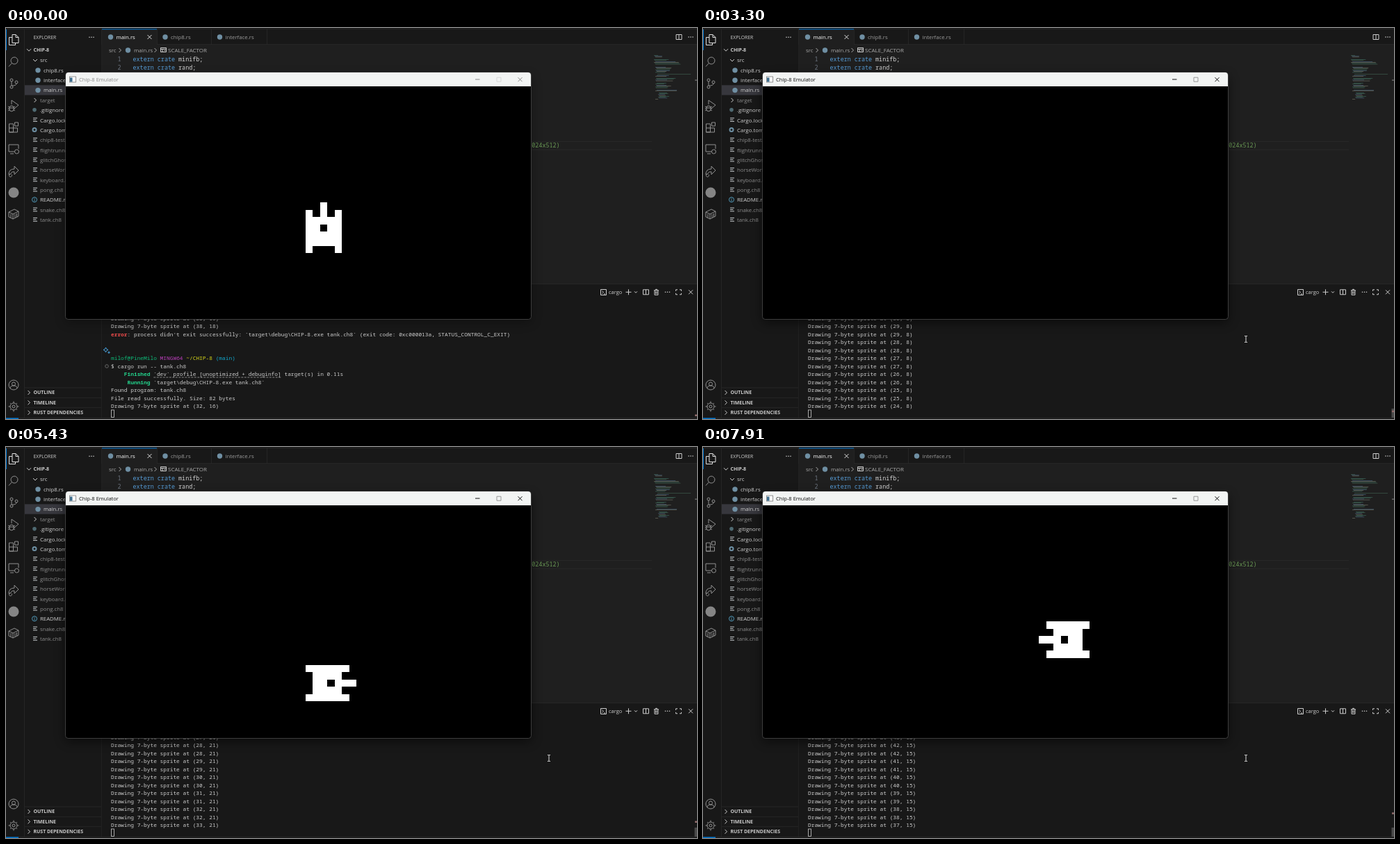
An HTML page that plays this animation: 994 px wide and 563 px high, repeating every 8000 ms.

```html
<!DOCTYPE html>
<html lang="en">
<head>
<meta charset="utf-8">
<title>Chip-8 Emulator</title>
<style>
html, body { margin: 0; width: 100%; height: 100%; overflow: hidden; background: #181818; }
svg { display: block; width: 100vw; height: 100vh; }
text { font-family: "Open Sans", "Noto Sans", sans-serif; white-space: pre; }
.mono { font-family: "Noto Sans Mono", "DejaVu Sans Mono", monospace; }
.line { fill: none; stroke-width: 1; }
</style>
</head>
<body>
<svg id="stage" viewBox="0 0 994 563"></svg>
<script>
const LOOP = 8000;
const CELL = 669 / 64;
const SCREEN = { x: 86, y: 84 };
const ROW = 11.52, LAST_ROW = 547.4, ROWS = 13;

// ---------- drawing helpers ----------
const rect = (x, y, w, h, fill, extra = '') =>
  `<rect x="${x}" y="${y}" width="${w}" height="${h}" fill="${fill}" ${extra}/>`;
const disc = (x, y, r, fill) => `<circle cx="${x}" cy="${y}" r="${r}" fill="${fill}"/>`;
const line = (d, stroke = '#ccc', x = 0, y = 0, extra = '') =>
  `<path class="line" transform="translate(${x} ${y})" d="${d}" stroke="${stroke}" ${extra}/>`;
// y is the middle of the capital letters
const label = (x, y, str, fill = '#ccc', size = 7.8, extra = '') =>
  `<text x="${x}" y="${y + size * 0.357}" font-size="${size}" fill="${fill}" ${extra}>${str}</text>`;
const code = (x, y, str, fill) => label(x, y, str, fill, 8.42, 'class="mono"');
const span = (str, fill, extra = '') => `<tspan fill="${fill}" ${extra}>${str}</tspan>`;

const RIGHT = 'M-1.5 -3l3 3l-3 3', DOWN = 'M-3 -1.5l3 3l3 -3';
const CROSS = 'M-3 -3l6 6m0 -6l-6 6', SPLIT = 'M-4 -3.5h8v7h-8zM0 -3.5v7';
const dots = (x, y) => [-3, 0, 3].map(d => disc(x + d, y, 0.8, '#ccc')).join('');

// ---------- editor ----------
function activityBar() {
  const icons = [
    [17, 'M-2 -7.500h5l4 4v8h-9zM3 -7.500v4h4M-2 -3.500h-4.500v11h9v-3', '#e0e0e0'],
    [48, 'M-3 2a5 5 0 1 1 1 1zM-2.500 2.500l-4.500 5'],
    [80, 'M-5 -5a2 2 0 1 1 4 0a2 2 0 1 1 -4 0M-5 5a2 2 0 1 1 4 0a2 2 0 1 1 -4 0M2 -2a2 2 0 1 1 4 0a2 2 0 1 1 -4 0M-3 -3v6M4 0q0 3 -6 3'],
    [112, 'M-3 -2v-6l10 7l-6 5M-6 3a3 3 0 0 1 6 0v2a3 3 0 0 1 -6 0zM-6 3h6M-8 1l2 1M-8 4h2M-8 7l2 -1M2 1l-2 1M2 4h-2M2 7l-2 -1'],
    [143, 'M-6.500 -5h6v12h-6zM-6.500 1h12v6h-12zM1.500 -7h5v5h-5z'],
    [174, 'M1 4h-8v-10h14v6M-5 7h5M1.500 4a3 3 0 1 1 6 0a3 3 0 1 1 -6 0'],
    [205, 'M-7 6q0 -8 8 -8v-4l6 6l-6 6v-4q-5 0 -5 3zM-6 6a2 2 0 1 0 3 0'],
    [268, 'M-7 -3l8 -4l6 3v7l-8 4l-6 -3zM-7 -3l6 3l8 -4M-1 0v7M-4 0v5M2 0v5M4.500 -1v5'],
    [514, 'M-7 0a7 7 0 1 1 14 0a7 7 0 1 1 -14 0M-2.500 -1.500a2.500 2.500 0 1 1 5 0a2.500 2.500 0 1 1 -5 0M-5 5q0 -4 5 -4q5 0 5 4'],
    [545, 'M-2 0a2 2 0 1 1 4 0a2 2 0 1 1 -4 0M-5 0a5 5 0 1 1 10 0a5 5 0 1 1 -10 0M0 -7.500v2.500M0 5v2.500M-7.500 0h2.500M5 0h2.500M-5 -5l1.500 1.500M5 5l-1.500 -1.500M5 -5l-1.500 1.500M-5 5l1.500 -1.500'],
  ];
  return rect(26, 2, 0.7, 559, '#2b2b2b') + rect(0, 2, 1, 30, '#0078d4') +
    icons.map(([y, d, color = '#909090']) => line(d, color, 11, y)).join('') +
    disc(11, 237, 7.5, '#858585');
}

function sidebar() {
  const files = [
    ['src', 'open'], ['chip8.rs', 'rust'], ['interface.rs', 'rust'], ['main.rs', 'rust'],
    ['target', 'closed', 1], ['.gitignore', 'git'], ['Cargo.lock', 'list'], ['Cargo.toml', 'gear'],
    ['chip8-test.ch8', 'list', 1], ['flightrunner.ch8', 'list', 1], ['glitchGhost.ch8', 'list', 1],
    ['horseWorld.ch8', 'list', 1], ['keyboard.ch8', 'list', 1], ['pong.ch8', 'list', 1],
    ['README.md', 'info'], ['snake.ch8', 'list', 1], ['tank.ch8', 'list', 1],
  ];
  const icon = {
    open: y => line(DOWN, '#ccc', 42, y),
    closed: y => line(RIGHT, '#ccc', 42, y),
    rust: y => disc(46, y, 3.7, '#6f8fa3'),
    git: y => disc(41, y - 0.5, 2.8, '#4f6a72'),
    list: y => line('M-3 -2.600h6M-3 -.2h4.500M-3 2.200h6', '#c0c5c8', 42, y - 0.4),
    gear: y => line('M-2.500 0a2.500 2.500 0 1 1 5 0a2.500 2.500 0 1 1 -5 0', '#6d8fa3', 41, y - 0.5, 'style="stroke-width:2"'),
    info: y => line('M-3.500 0a3.500 3.500 0 1 1 7 0a3.500 3.500 0 1 1 -7 0M0 -.5v2.500M0 -2v.8', '#519aba', 41, y - 0.5),
  };
  const section = (y, name, d = RIGHT) => line(d, '#ccc', 33, y) +
    label(39.5, y, name, '#ccc', 6.95, 'font-weight="700"');
  let out = label(39.5, 13.3, 'EXPLORER', '#ccc', 6.8) + dots(123, 13.3) +
    rect(27, 82.3, 110, 14.3, '#37373d') + section(31.7, 'CHIP-8', DOWN);
  files.forEach(([name, kind, dim], i) => {
    const y = 46.5 + 14.37 * i;
    out += icon[kind](y) + label(kind === 'rust' ? 54 : 49, y, name, dim ? '#8c8c8c' : '#d0d0d0');
  });
  ['OUTLINE', 'TIMELINE', 'RUST DEPENDENCIES'].forEach((name, i) => {
    const y = 525 + 14.4 * i;
    out += rect(27, y - 7.4, 110, 0.7, '#2b2b2b') + section(y, name);
  });
  return out + rect(137, 2, 0.7, 559, '#2b2b2b');
}

function minimap() {
  // first y, last y, indent, width
  const blocks = [[39, 42, 0, 11], [45, 47, 0, 24], [48, 53, 0, 42], [56, 64, 2, 24], [66, 67, 4, 54],
    [68, 70, 2, 20], [72, 77, 2, 30], [79, 81, 2, 16], [82, 87, 2, 24], [89, 91, 2, 48], [93, 101, 6, 16], [102, 103, 0, 5]];
  const colors = ['#4b7562', '#53779a', '#8a8a78', '#45806f'];
  let out = '', n = 0;
  for (const [top, bottom, indent, width] of blocks)
    for (let y = top; y < bottom; y += 1.25, n++) {
      const noise = Math.abs(Math.sin(n * 12.99) * 43.7) % 1;
      out += rect(932 + indent + n % 3, y, width * (0.55 + 0.45 * noise), 0.7, colors[n % 4], 'opacity=".7"');
    }
  return out;
}

function editor() {
  const tab = (x, name, color) => disc(x, 13, 3.7, '#6f8fa3') + label(x + 8, 13.3, name, color);
  return rect(137.7, 24, 857, 345, '#1f1f1f') +
    rect(137.7, 23.3, 857, 0.7, '#2b2b2b') + rect(138, 2, 79, 22, '#1f1f1f') + rect(138, 1.3, 79, 1, '#0078d4') +
    [217, 295, 375].map(x => rect(x, 2, 0.7, 22, '#2b2b2b')).join('') +
    tab(150.5, 'main.rs', '#fff') + line(CROSS, '#ddd', 206.5, 13) +
    tab(229, 'chip8.rs', '#9d9d9d') + tab(307.5, 'interface.rs', '#9d9d9d') +
    line(SPLIT, '#ccc', 968, 13) + dots(985, 13) +
    label(148, 32, 'src', '#a9a9a9') + line(RIGHT, '#a9a9a9', 164, 32) + disc(175.500, 32, 3.7, '#6f8fa3') +
    label(184, 32, 'main.rs', '#a9a9a9') + line(RIGHT, '#a9a9a9', 215, 32) +
    line('M-4 -3h8v6h-8zM-4 -1h8M-1.500 -1v4M1 1h2', '#ccc', 226.5, 31.5) + label(233, 32, 'SCALE_FACTOR', '#a9a9a9', 8) +
    ['minifb', 'rand'].map((name, i) => {
      const y = 44.7 + 12.5 * i;
      return code(160.5, y, i + 1, '#6e7681') +
        code(182.5, y, span('extern crate', '#569cd6') + span(` ${name};`, '#d4d4d4'));
    }).join('') +
    rect(182, 163.2, 747, 0.8, '#2b2b2b') + rect(182, 174.8, 747, 0.8, '#2b2b2b') +
    code(756.3, 169.4, '024x512)', '#6a9955') +
    minimap() + rect(991, 74.6, 3, 1, '#8a8a8a');
}

function panel() {
  return rect(137.7, 368, 857, 193, '#181818') + rect(137.7, 368, 857, 0.8, '#2b2b2b') +
    line('M-4 -4h8v8h-8zM-2 -2l2 2l-2 2M.5 2.500h2', '#ccc', 859.500, 380.5) + label(867, 380.7, 'cargo', '#ccc', 7.5) +
    line('M-4 0h8M0 -4v8', '#ccc', 895.5, 380.3) + line('M-2 -1l2 2l2 -2', '#ccc', 906, 380.3) +
    line(SPLIT, '#ccc', 920.5, 380.3) +
    line('M-3.500 -2.500h7M-2.500 -2.500v6.500h5v-6.500M-1 -2.500v-1.500h2v1.500M-.8 -1v3.500M.8 -1v3.500', '#ccc', 935.5, 380.3) +
    dots(951.5, 380.3) +
    line('M-4 -1.500v-2h2.500M4 -1.500v-2h-2.500M-4 1.500v2h2.500M4 1.500v2h-2.500', '#ccc', 967.5, 380.3) +
    line(CROSS, '#ccc', 985, 380.3);
}

// ---------- terminal log ----------
const sprite = (x, y) => ({ text: `Drawing 7-byte sprite at (${x}, ${y})` });
const bold = 'font-weight="700"';
const intro = [
  sprite(38, 19), sprite(38, 18),
  { text: span('error', '#f14c4c', bold) + ": process didn't exit successfully: `target\\debug\\CHIP-8.exe tank.ch8` (exit code: 0xc000013a, STATUS_CONTROL_C_EXIT)" },
  { text: '' },
  { text: '', mark: y => `<path transform="translate(145 ${y})" fill="none" stroke="#4aa3df" d="M-1.500 -4q.5 3 3.500 3.500q-3 .5 -3.500 3.500q-.5 -3 -3.500 -3.500q3 -.5 3.500 -3.500M3 1.500v3.500M1.300 3.200h3.500"/>` },
  { text: span('milof@PineMilo', '#0dbc79') + ' ' + span('MINGW64', '#bc3fbc') + ' ' + span('~/CHIP-8', '#d8d81a') + ' ' + span('(main)', '#11a8cd') },
  { text: '$ cargo run -- tank.ch8', mark: y => `<circle cx="145" cy="${y}" r="2.300" fill="none" stroke="#666"/>` },
  { text: '    ' + span('Finished', '#23d18b', bold) + ' `dev` profile [unoptimized + debuginfo] target(s) in 0.11s',
    mark: y => line('M212.300 0h184', '#bbb', 0, y + 4.5, 'stroke-dasharray="3 1.500" style="stroke-width:.7"') },
  { text: '     ' + span('Running', '#23d18b', bold) + ' `target\\debug\\CHIP-8.exe tank.ch8`' },
  { text: 'Found program: tank.ch8' },
  { text: 'File read successfully. Size: 82 bytes' },
];

// ---------- tank ----------
const SHAPES = {
  up: [0x10, 0x54, 0x7c, 0x6c, 0x7c, 0x7c, 0x44],
  down: [0x44, 0x7c, 0x7c, 0x6c, 0x7c, 0x54, 0x10],
  right: [0, 0xfc, 0x78, 0x6e, 0x78, 0xfc, 0],
  left: [0, 0x3f, 0x1e, 0x76, 0x1e, 0x3f, 0],
};
const STEP = { up: [0, -1], down: [0, 1], left: [-1, 0], right: [1, 0] };

// start, end, pictures shown, direction, cells travelled
const moves = [
  [1770, 1960, 4, 'up', 8], [2690, 2900, 4, 'left', 8], [3240, 3370, 3, 'left', 6],
  [3770, 3980, 4, 'down', 7], [4240, 4440, 4, 'down', 6], [4700, 4830, 3, 'right', 6],
  [4960, 5100, 3, 'right', 6], [5360, 5490, 3, 'right', 6], [5750, 5920, 3, 'right', 6],
  [6170, 6320, 3, 'up', 6], [6970, 7120, 3, 'right', 7], [7380, 7580, 4, 'left', 6], [7720, 7910, 4, 'left', 6],
];

const path = [{ x: 32, y: 16, dir: 'up' }];
const events = [{ time: 0, at: 0, shown: true }];
for (const [start, end, count, dir, cells] of moves) {
  const base = path.length - 1;
  for (let i = 0; i < cells; i++) {
    const { x, y } = path[path.length - 1];
    path.push({ x: x + STEP[dir][0], y: y + STEP[dir][1], dir });
  }
  // each burst opens with the erased sprite
  for (let k = 0; k < count; k++) {
    const part = k / (count - 1);
    events.push({ time: start + (end - start) * part, at: base + Math.round(cells * part), shown: k > 0 });
  }
}

// every step logs one erase and one draw
const log = [...intro, sprite(path[0].x, path[0].y)];
for (let i = 1; i < path.length; i++)
  log.push(sprite(path[i - 1].x, path[i - 1].y), sprite(path[i].x, path[i].y));

function tankPath({ x, y, dir }) {
  let d = '';
  SHAPES[dir].forEach((bits, row) => {
    for (let col = 0; col < 8; col++)
      if (bits & (0x80 >> col))
        d += `M${SCREEN.x + (x + col) * CELL} ${SCREEN.y + (y + row) * CELL}h${CELL}v${CELL}h${-CELL}z`;
  });
  return d;
}

function terminalRows(at) {
  const end = intro.length + 1 + 2 * at;
  return log.slice(Math.max(0, end - ROWS), end).reverse().map(({ text, mark }, i) => {
    const y = LAST_ROW - i * ROW;
    return `<text class="mono" x="151" y="${y}" font-size="7.855" fill="#ccc">${text}</text>` + (mark ? mark(y - 2.8) : '');
  }).join('');
}

// ---------- scene ----------
const $ = id => document.getElementById(id);
$('stage').innerHTML = `
  <defs><filter id="blur" x="-10%" y="-20%" width="120%" height="140%"><feGaussianBlur stdDeviation="8"/></filter></defs>
  ${rect(0, 0, 994, 563, '#181818')}${rect(0, 1, 994, 0.7, '#2b2b2b')}
  ${activityBar()}${sidebar()}${editor()}${panel()}
  <g id="log"></g>
  <rect x="151.500" y="550" width="4" height="10.500" fill="none" stroke="#ccc" stroke-width=".8"/>
  ${rect(990.5, 548, 3.5, 13, '#4a4a4a', 'id="slider"')}
  ${rect(991, 0, 3, 2.5, '#8f6a6a', 'id="mark"')}
  ${rect(0, 561, 994, 0.7, '#2b2b2b')}${rect(0, 561.5, 18, 1.5, '#0078d4')}
  ${rect(86, 70, 669, 353, '#000', 'id="shadow" filter="url(#blur)"')}
  ${rect(85.5, 64, 670, 355.5, '#000', 'rx="4" stroke="#555" stroke-width=".7"')}
  <path d="M86 84v-16q0 -4 4 -4h661q4 0 4 4v16z" fill="#f2f4f3"/>
  ${rect(91.5, 70, 9, 8, '#fff', 'stroke="#777" stroke-width=".8"')}${rect(92, 71.500, 3.5, 6, '#3f6f8f')}
  <g id="title">${label(105, 74.2, 'Chip-8 Emulator', 'currentColor', 7.55)}
  ${line('M-3 0h6.500', 'currentColor', 678, 74)}${line(CROSS, 'currentColor', 739.5, 74.2)}</g>
  ${line('M-3 -3h6v6h-6z', '#b0b0b0', 709, 74.2, 'id="maximise"')}
  <path id="tank" fill="#fff" shape-rendering="crispEdges"/>
  <path id="arrow" d="M0 0v10l2.500 -2.300l1.700 3.600l1.500 -.7l-1.700 -3.500h3.300z" fill="#fff" stroke="#000" stroke-width=".6"/>
  <path id="beam" class="line" d="M-2 -4.500h1.500l.5 .5l.5 -.5h1.500M0 -4v8M-2 4.500h1.500l.5 -.5l.5 .5h1.500" stroke="#ddd"/>`;

// time, x, y of the pointer
const pointer = [[70, 795, 524], [190, 621, 322], [640, 621, 322], [1290, 781, 448]];

function pointerAt(t) {
  const next = pointer.findIndex(p => p[0] > t);
  if (next < 0) return pointer[pointer.length - 1].slice(1);
  if (next === 0) return null;
  const [t0, x0, y0] = pointer[next - 1], [t1, x1, y1] = pointer[next];
  const u = (t - t0) / (t1 - t0), ease = u * u * (3 - 2 * u);
  return [x0 + (x1 - x0) * ease, y0 + (y1 - y0) * ease];
}

const show = (id, on) => $(id).setAttribute('visibility', on ? 'visible' : 'hidden');
let lastEvent;

function render() {
  const t = performance.now() % LOOP;
  const event = events.filter(e => e.time <= t).pop();
  if (event !== lastEvent) {
    lastEvent = event;
    $('log').innerHTML = terminalRows(event.at);
    $('tank').setAttribute('d', event.shown ? tankPath(path[event.at]) : '');
    $('mark').setAttribute('y', 556.5 - 0.36 * event.at * 0.5 * 2 / 1);
  }

  const active = t >= 570;
  $('title').setAttribute('color', active ? '#111' : '#8c8c8c');
  $('maximise').setAttribute('stroke', active ? '#999' : '#d8d8d8');
  $('shadow').setAttribute('opacity', active ? 0.6 : 0.35);

  const spot = pointerAt(t);
  const inWindow = spot && spot[0] < 755 && spot[1] < 419;
  show('arrow', inWindow);
  show('beam', spot && !inWindow);
  show('slider', t > 570 && !inWindow);
  if (spot) for (const id of ['arrow', 'beam']) $(id).setAttribute('transform', `translate(${spot})`);
  requestAnimationFrame(render);
}
render();
</script>
</body>
</html>
```
